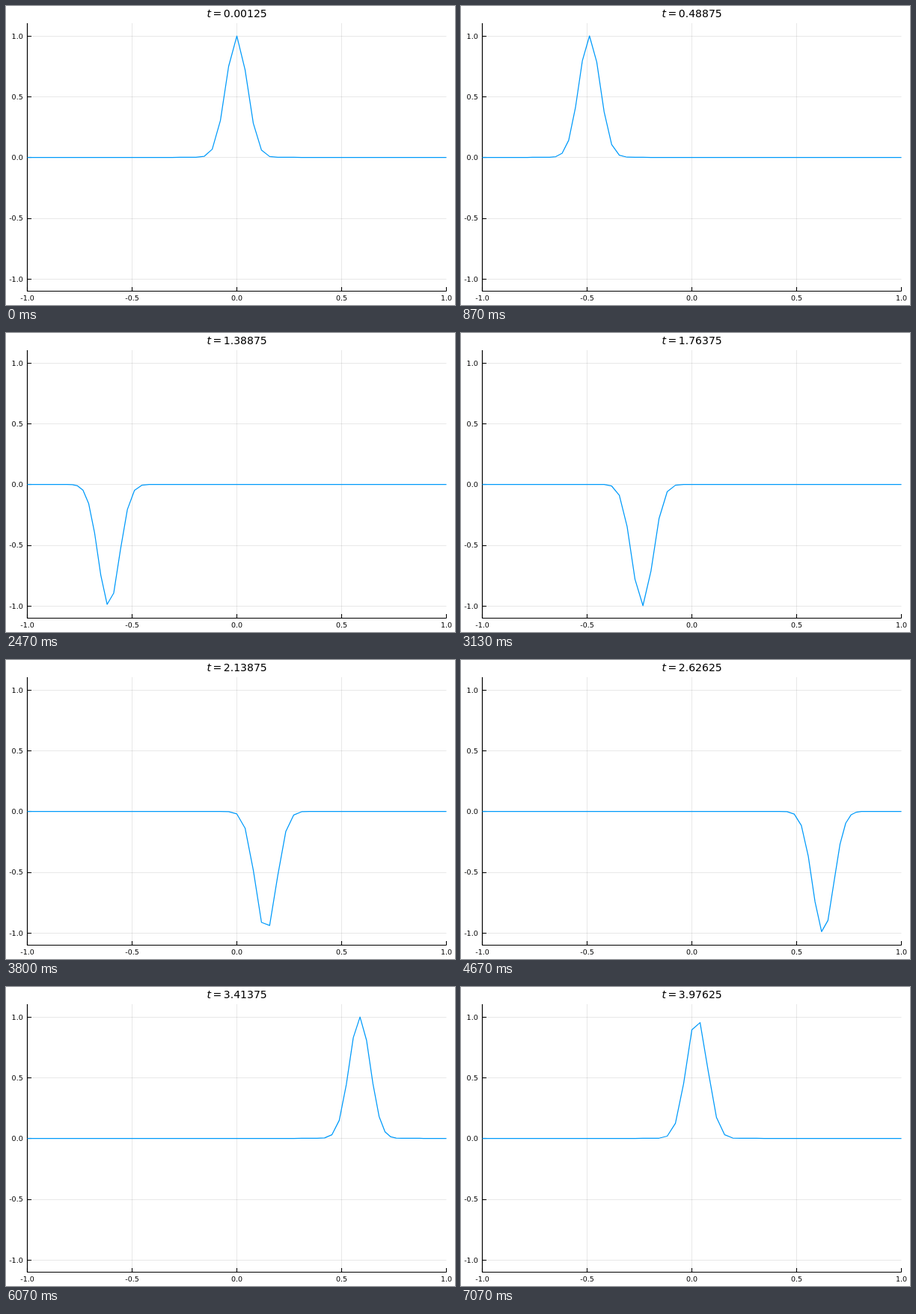
An HTML page with a canvas that plays this animation: 600 px wide and 400 px high, repeating every 7.14 s.

```html
<!DOCTYPE html>
<html lang="en">
<head>
<meta charset="utf-8">
<title>Reflected wave pulse</title>
<style>
html, body { margin: 0; width: 100%; height: 100%; overflow: hidden; background: #fff; }
canvas { display: block; width: 600px; height: 400px; }
</style>
</head>
<body>
<canvas id="plot" width="600" height="400"></canvas>
<script>
const ctx = document.getElementById("plot").getContext("2d");
const LOOP = 7140, LAST = 106;
const N = 80, DT = 8 / (N * N), STEP = 30 * DT;
const LEFT = 28.5, RIGHT = 588.5, TOP = 23, BOTTOM = 381.5;
const FONT = '"DejaVu Sans", sans-serif';
const TICKS = [-1, -0.5, 0, 0.5, 1];

const px = x => 308.5 + 280 * x;
const py = y => 202.5 - 162.5 * y;
const snap = v => Math.floor(v + 0.3) + 0.5;
const gauss = x => Math.exp(-200 * x * x);

// Left-going pulse plus its mirror images at the fixed ends
const wave = (x, t) => gauss(x + t) - gauss(x + 2 - t) + gauss(x - 4 + t);

function stroke(points, color, width) {
  ctx.beginPath();
  for (const [x, y] of points) ctx.lineTo(x, y);
  ctx.strokeStyle = color;
  ctx.lineWidth = width;
  ctx.stroke();
}

function text(str, x, y, font, align) {
  ctx.font = font + " " + FONT;
  ctx.textAlign = align;
  ctx.fillStyle = "#000";
  ctx.fillText(str, x, y);
}

function drawAxes() {
  for (const v of TICKS) {
    const x = px(v), y = snap(py(v));
    if (Math.abs(v) < 1) stroke([[x, TOP], [x, BOTTOM]], "rgba(0,0,0,0.1)", 0.9);
    stroke([[LEFT, y], [RIGHT, y]], "rgba(0,0,0,0.1)", 0.9);
  }
  stroke([[LEFT, TOP], [LEFT, BOTTOM], [RIGHT, BOTTOM]], "#000", 1.2);
  for (const v of TICKS) {
    const x = px(v), y = snap(py(v)), label = v.toFixed(1);
    stroke([[x, BOTTOM], [x, BOTTOM - 5.5]], "#000", 1.1);
    stroke([[LEFT, y], [LEFT + 5.5, y]], "#000", 1.1);
    text(label, x, 394, "9.5px", "center");
    text(label, 22.7, py(v) + 3.6, "9.5px", "right");
  }
}

function drawTitle(t) {
  text("t", 268.4, 15, "italic 14px", "left");
  text("=", 276.6, 15, "14px", "left");
  text(t.toFixed(5), 290.8, 15, "14px", "left");
}

function draw(ms) {
  const tick = Math.floor((ms % LOOP) / 10);
  const k = Math.min(LAST, Math.floor((tick + 0.5) * 0.15));
  const t = DT + k * STEP;
  ctx.fillStyle = "#fff";
  ctx.fillRect(0, 0, 600, 400);
  drawAxes();
  drawTitle(t);
  const curve = [];
  for (let j = 0; j <= N; j++) {
    const x = Math.cos(Math.PI * j / N);
    curve.push([px(x), py(wave(x, t))]);
  }
  ctx.lineJoin = "round";
  stroke(curve, "#009afa", 1.25);
}

const start = performance.now();
function loop() {
  draw(performance.now() - start);
  requestAnimationFrame(loop);
}
loop();
</script>
</body>
</html>
```
